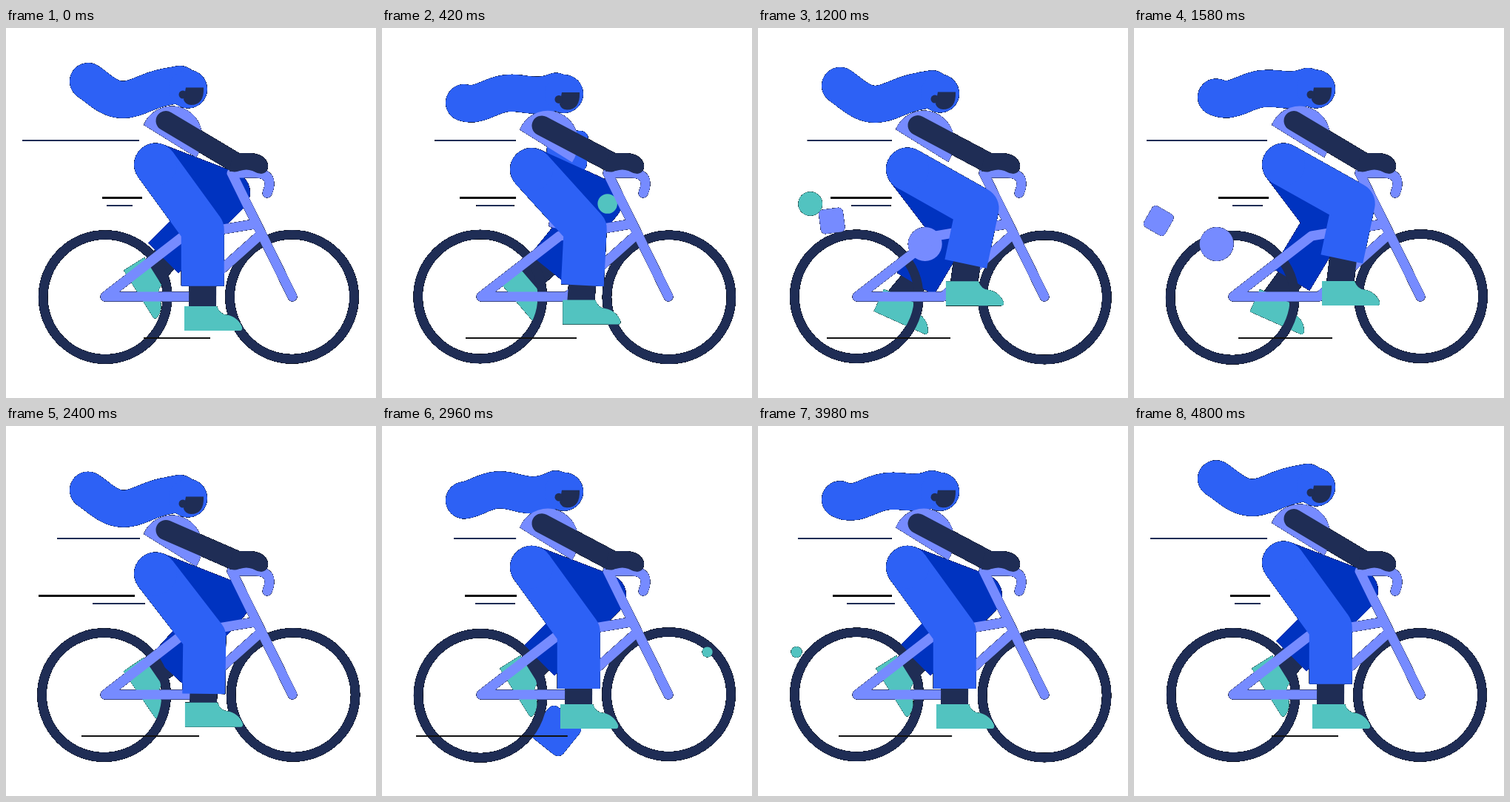
Write an HTML page that moves like this. It is 500x500 px and loops after 4.82 s.

```html
<!DOCTYPE html>
<html lang="en">
<head>
<meta charset="utf-8">
<title>Cyclist</title>
<style>
html, body { margin: 0; width: 100%; height: 100%; overflow: hidden; background: #fff; }
svg { display: block; width: 100vw; height: 100vh; }
.line { fill: none; stroke-linejoin: round; }
.round { stroke-linecap: round; }
</style>
</head>
<body>
<svg viewBox="0 0 500 500">
  <defs>
    <path id="shoe" d="M0 0H44Q48 11 57 11.5Q72 14 78 28Q79 33 75 33H0Z" fill="#52c3c0"/>
    <!-- Hard dark rim: soft edge pixels are backed with black -->
    <filter id="rim" filterUnits="userSpaceOnUse" x="0" y="0" width="500" height="500" color-interpolation-filters="sRGB">
      <feComponentTransfer in="SourceAlpha" result="edge">
        <feFuncA type="linear" slope="12" intercept="-2"/>
      </feComponentTransfer>
      <feMerge><feMergeNode in="edge"/><feMergeNode in="SourceGraphic"/></feMerge>
    </filter>
  </defs>
  <g id="scene" filter="url(#rim)">
    <g id="back"></g>
    <g id="rearLeg">
      <path id="rearAnkle" class="line" stroke="#1f2d55" stroke-width="37"/>
      <path id="rearPants" class="line" stroke="#0033c0" stroke-width="58"/>
      <use id="rearShoe" href="#shoe"/>
    </g>
    <g fill="none" stroke="#1f2d55" stroke-width="12.5">
      <circle id="rearWheel" r="84"/>
      <circle id="frontWheel" r="84"/>
    </g>
    <g id="mid"></g>
    <g class="line round" stroke="#768bff" stroke-width="13">
      <path d="M338 264.5L240 281L134 363H250L343 280"/>
      <path d="M387 363L305 196H338Q356 197 356 210Q356 216 353 223"/>
    </g>
    <path id="frontAnkle" class="line" stroke="#1f2d55" stroke-width="37"/>
    <path id="frontPants" class="line" stroke="#2d61f5" stroke-width="58"/>
    <circle id="hip" r="29" fill="#2d61f5"/>
    <use id="frontShoe" href="#shoe"/>
    <g id="upper">
      <path id="hair" class="line round" stroke="#2d61f5" stroke-width="50"/>
      <circle cx="246" cy="82.5" r="26" fill="#2d61f5"/>
      <path d="M243 80.5H267Q268 104 250 104Q243 104 240 97Z" fill="#1f2d55"/>
      <circle cx="239" cy="90" r="5.5" fill="#1f2d55"/>
      <path d="M186 131A41 41 0 0 1 265 146Q265 163 257 175Z" fill="#768bff"/>
    </g>
    <path id="arm" class="line round" stroke="#1f2d55" stroke-width="27"/>
    <path d="M306 169H332Q350 171 354 184Q355 196 345 197Q338 196 333 193Q325 190 316 193L302 194Z" fill="#1f2d55"/>
    <g id="wind"></g>
  </g>
</svg>
<script>
const LOOP = 4820, TAU = Math.PI * 2;
const BLUE = '#2d61f5', PERI = '#768bff', TEAL = '#52c3c0';
const $ = id => document.getElementById(id);
const mix = (a, b, k) => a + (b - a) * k;
const clamp = v => Math.max(0, Math.min(1, v));
const set = (el, attrs) => { for (const k in attrs) el.setAttribute(k, attrs[k]); };

function add(parent, tag, attrs) {
  const el = document.createElementNS('http://www.w3.org/2000/svg', tag);
  set(el, attrs);
  return parent.appendChild(el);
}

// Cosine easing between [time, value] keys
function ease(t, keys) {
  let i = 0;
  while (i < keys.length - 2 && t > keys[i + 1][0]) i++;
  const [t0, a] = keys[i], [t1, b] = keys[i + 1];
  return mix(a, b, (1 - Math.cos(Math.PI * clamp((t - t0) / (t1 - t0)))) / 2);
}

// Smooth looping curve that never overshoots its values
const BEATS = [0, 820, 1580, 2400, 2960, 3980, LOOP];
function flow(t, vals) {
  const n = vals.length;
  const slope = i => (vals[(i + 1) % n] - vals[i % n]) / (BEATS[i % n + 1] - BEATS[i % n]);
  const tangent = i => {
    const a = slope((i + n - 1) % n), b = slope(i);
    return a * b > 0 ? 2 * a * b / (a + b) : 0;
  };
  let i = 0;
  while (i < n - 1 && t >= BEATS[i + 1]) i++;
  const d = BEATS[i + 1] - BEATS[i], k = (t - BEATS[i]) / d;
  const a = vals[i], b = vals[(i + 1) % n], u = 1 - k;
  return a * (1 + 2 * k) * u * u + b * k * k * (3 - 2 * k) +
    d * k * u * (tangent(i) * u - tangent((i + 1) % n) * k);
}

const BOB = [[0, 0], [803, 12], [1607, 0], [2410, 15], [3400, 0], [4145, 7], [LOOP, 0]];
const STEP = [[0, 0], [1270, 1], [1620, 1], [2560, 0], [LOOP, 0]];

const winds = [
  { y: 152, w: 2, color: '#1f2d55', left: [22, 117, 17, 69, 97, 54], right: x => 179.7 + x * .015 },
  { y: 229.5, w: 2.6, color: '#111', left: [130, 82, 114, 44, 112, 101], right: x => 169 + x * .115 },
  { y: 240, w: 2, color: '#1f2d55', left: [136, 120, 133, 117, 126, 120], right: x => 290 - x * .875 },
  { y: 419, w: 2, color: '#111', left: [186, 46, 141, 102, 46, 109], right: x => 242.5 + x * .18 }
].map(o => ({ ...o, el: add($('wind'), 'line', { y1: o.y, y2: o.y, stroke: o.color, 'stroke-width': o.w }) }));

// Each piece passes (x, y) at time "at", drifting left at speed v
const pieces = [
  { layer: 'back', color: BLUE, size: 55, at: 820, x: 118.5, y: 165.5, v: .33, from: 200, to: 1130, turn: 45, spin: -.12 },
  { layer: 'back', color: BLUE, size: 54, at: 2960, x: 235.5, y: 412, v: .33, from: 2500, to: 3560, turn: 39, spin: -.12 },
  { layer: 'mid', color: PERI, size: 33, at: 820, x: 166.5, y: 260.5, v: .175, from: 300, to: 1720, turn: 45, spin: -.138 },
  { layer: 'mid', color: TEAL, r: 16.5, at: 820, x: 185, y: 237.5, v: .3, from: 260, to: 1330 },
  { layer: 'mid', color: PERI, r: 23, at: 1580, x: 112, y: 292, v: .3, from: 960, to: 1860 },
  { layer: 'mid', color: TEAL, r: 9.5, at: 2960, x: 440, y: 305.5, v: .38, from: 2850, to: 4100, fade: 150 }
].map(o => {
  const h = o.size / 2;
  const el = o.r ? add($(o.layer), 'circle', { r: o.r, fill: o.color })
    : add($(o.layer), 'rect', { x: -h, y: -h, width: o.size, height: o.size, rx: o.size * .18, fill: o.color });
  return { ...o, el };
});

const polar = ([x, y], len, deg) => [x + len * Math.cos(deg * TAU / 360), y + len * Math.sin(deg * TAU / 360)];
const path = pts => 'M' + pts.map(p => p[0].toFixed(2) + ' ' + p[1].toFixed(2)).join('L');

function leg(name, hip, thigh, shin, shoe, tilt) {
  const knee = polar(hip, ...thigh), hem = polar(knee, ...shin);
  const ankle = polar(polar(shoe, 24.5, tilt), 4, tilt + 90);
  set($(name + 'Pants'), { d: path([hip, knee, hem]) });
  set($(name + 'Ankle'), { d: path([polar(knee, shin[0] * .75, shin[1]), ankle]) });
  set($(name + 'Shoe'), { transform: `translate(${shoe}) rotate(${tilt})` });
}

// A wave runs toward the tail and fades out at the head
function hair(t) {
  const wave = 124, crest = 98 - wave * t / 1205, pts = [];
  for (let x = 111; x <= 235; x += 4) {
    const mean = 88.5 - (x < 170 ? 6.5 : 9.4) * ((x - 170) / 60) ** 2;
    const amp = 13 - .09 * (x - 110);
    pts.push([x, mean - amp * Math.cos(TAU * (x - crest) / wave)]);
  }
  return path(pts);
}

function draw(t) {
  const bob = ease(t, BOB), p = ease(t, STEP), hip = [202, 184.5 + bob];

  leg('rear', hip, [mix(106, 96, p), mix(21, 53, p ** 1.6)], [mix(125, 92, p), mix(135, 121, p ** .6)],
    [mix(187, 170, p), mix(310, 353, p)], mix(58, 24, p));
  leg('front', hip, [108.5, mix(54, 29.2, p)], [76.5, mix(90, 102, p)],
    [mix(241, 254, p), mix(376, 342, p)], 0);
  set($('hip'), { cx: hip[0], cy: hip[1] });

  set($('upper'), { transform: `translate(0 ${bob})` });
  set($('hair'), { d: hair(t) });
  set($('arm'), { d: path([[216, 125.5 + bob], [309, 181]]) });

  const a = TAU * 7 * t / LOOP, dx = .8 * Math.cos(a), dy = .8 * Math.sin(a);
  set($('rearWheel'), { cx: 133.3 + dx, cy: 363.5 + dy });
  set($('frontWheel'), { cx: 387.3 - dx, cy: 363.3 - dy });

  for (const o of winds) {
    const x = flow(t, o.left);
    set(o.el, { x1: x, x2: o.right(x) });
  }
  for (const o of pieces) {
    const dt = t - o.at;
    const s = Math.min(clamp((t - o.from) / (o.fade || 200)), clamp((o.to - t) / (o.fade || 130)));
    const turn = o.spin ? o.turn + o.spin * dt : 0;
    set(o.el, {
      visibility: s > 0 ? 'visible' : 'hidden',
      transform: `translate(${o.x - o.v * dt} ${o.y}) rotate(${turn}) scale(${s})`
    });
  }
}

const start = performance.now();
function tick() {
  draw((performance.now() - start) % LOOP);
  requestAnimationFrame(tick);
}
tick();
</script>
</body>
</html>
```
